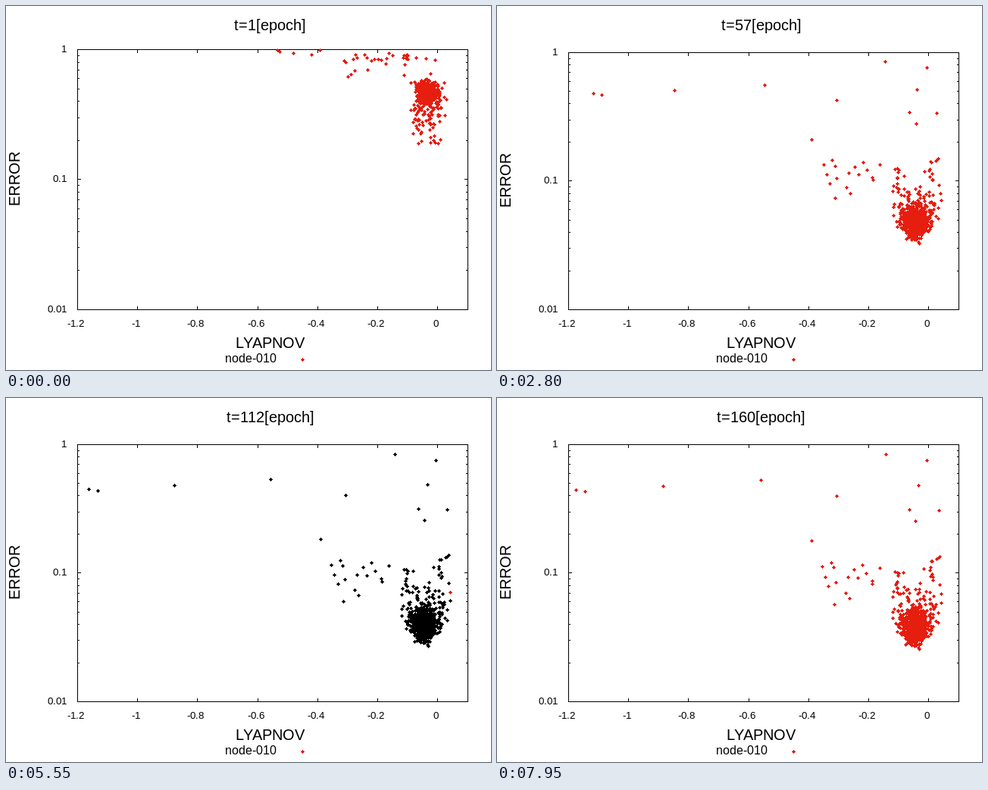
Recreate the animation shown at these times as an HTML page with a canvas. Size 640 by 480 pixels, loop 8000 ms.

```html
<!DOCTYPE html>
<html lang="en">
<head>
<meta charset="utf-8">
<title>Error against exponent</title>
<style>
html, body { margin: 0; width: 100%; height: 100%; overflow: hidden; background: #fff; }
canvas { display: block; width: 640px; height: 480px; }
</style>
</head>
<body>
<canvas id="stage" width="640" height="480"></canvas>
<script>
const ctx = document.getElementById('stage').getContext('2d');
const STEP = 50, EPOCHS = 160, BLACK_EPOCH = 112;
const RED = '#e51e10', BLACK = '#000';
const LEFT = 94, RIGHT = 609, BOTTOM = 400;

let seed = 20117;
const random = () => (seed = (seed * 16807) % 2147483647) / 2147483647;
const bell = () => (random() + random() + random() - 1.5) * 2;
const many = (length, make) => Array.from({ length }, make);
const mix = (a, b, k) => a + (b - a) * k;

// The swarm is wide on top and narrow below; some nodes trail off in a tail.
const swarm = many(620, () => {
  const trails = random() < 0.2;
  const v = bell();
  const u = bell() * (trails ? 1.6 : 1 - 0.2 * v);
  return { u, v, tail: trails ? Math.min(2.6, -Math.log(random())) : 0 };
});

// Strays travel from x0, y0 to x1, y1.
const marked = [570, 130, 586.3, 258.4];
const outliers = [
  [358, 58, 104, 121], [361, 60, 116, 123], [379, 62, 219, 116], [403, 64, 348, 108],
  [414, 58, 415, 188], [446, 72, 448, 129], [505, 62, 513, 74], [530, 65, 556, 115],
  [541, 68, 544, 147], [554, 69, 583, 148], [566, 71, 567, 82], [560, 89, 552, 162]
];
const leftSkirt = many(28, () => {
  const reach = random() ** 2;
  return [530 - 85 * reach, 64 + 50 * random() ** 2, 530 - 105 * reach, 245 + 20 * bell()];
});
const rightEdge = many(13, () => {
  const rise = random();
  return [560 + 12 * random(), 100 + 45 * random(), 568 + 16 * random(), 285 - 80 * rise];
});
const strays = [...outliers, ...leftSkirt, ...rightEdge];

// Training is fast at first and slows down over log(epoch).
const progress = t => 1 - (1 - Math.log(t) / Math.log(EPOCHS)) ** 1.5;

const snap = v => Math.ceil(v - 0.5);

function rect(x, y, w, h) {
  ctx.fillRect(snap(x), snap(y), w, h);
}

function diamond(x, y, color) {
  ctx.fillStyle = color;
  rect(x - 2, y, 5, 1);
  rect(x - 1, y - 1, 3, 3);
  rect(x, y - 2, 1, 5);
}

const setFont = size => ctx.font = `${size}px "Liberation Sans", Arial, sans-serif`;
const widthOf = text => ctx.measureText(text).width;

// Glyphs stand on whole pixels, with rounded advances and kerning.
function label(text, x, y, size, align = 0.5) {
  setFont(size);
  let pen = 0;
  const starts = [...text].map((glyph, i) => {
    const before = text[i - 1] || '';
    if (before) pen += Math.round(widthOf(before + glyph) - widthOf(before) - widthOf(glyph));
    const at = pen;
    pen += Math.round(widthOf(glyph));
    return at;
  });
  const left = Math.floor(x - pen * align);
  starts.forEach((at, i) => ctx.fillText(text[i], left + at, y));
}

function drawAxes(top, t) {
  const width = RIGHT - LEFT, height = BOTTOM - top;
  ctx.fillStyle = BLACK;
  for (const y of [top, BOTTOM]) rect(LEFT, y, width + 1, 1);
  for (const x of [LEFT, RIGHT]) rect(x, top, 1, height + 1);

  for (let i = 0; i <= 6; i++) {
    const x = LEFT + i * 0.2 * width / 1.3;
    rect(x, top, 1, 5);
    rect(x, BOTTOM - 4, 1, 5);
    label(String((i * 2 - 12) / 10), x - 1.5, 423, 13.333);
  }
  for (let decade = 0; decade < 2; decade++) {
    for (let n = 1; n < 10; n++) {
      const y = BOTTOM - (decade + Math.log10(n)) * height / 2;
      const size = n === 1 ? 5 : 3;
      rect(LEFT, y, size, 1);
      rect(RIGHT - size + 1, y, size, 1);
    }
  }
  ['1', '0.1', '0.01'].forEach((text, i) =>
    label(text, 80, Math.floor(top + i * height / 2) + 4, 13.333, 1));

  label(`t=${t}[epoch]`, 349, 32, 20);
  label('LYAPNOV', 349, 451, 20);
  label('node-010', 357, 470, 16, 1);

  ctx.save();
  ctx.translate(18, snap((top + BOTTOM) / 2));
  ctx.rotate(-Math.PI / 2);
  setFont(20);
  ctx.fillText('ERROR', -widthOf('ERROR') / 2, 0);
  ctx.restore();
}

function drawPoints(t) {
  const k = progress(t);
  const color = t === BLACK_EPOCH ? BLACK : RED;
  const cx = mix(555, 551, k), cy = mix(114, 303, k);
  const sx = mix(6.5, 9, k), sy = mix(7, 11, k);
  const tail = mix(23, -22, k);
  const drawStray = ([x0, y0, x1, y1], paint) => diamond(mix(x0, x1, k), mix(y0, y1, k), paint);

  for (const n of swarm) diamond(cx + sx * n.u, cy + sy * n.v + tail * n.tail, color);
  for (const s of strays) drawStray(s, color);
  drawStray(marked, RED);
  diamond(391, 466, RED);
}

let shown = 0;
function render(now) {
  const t = Math.floor(now / STEP) % EPOCHS + 1;
  if (t === shown) return;
  shown = t;
  ctx.fillStyle = '#fff';
  ctx.fillRect(0, 0, 640, 480);
  drawAxes(t === 1 ? 57 : 61, t);
  drawPoints(t);
}

const start = performance.now();
function tick() {
  render(performance.now() - start);
  requestAnimationFrame(tick);
}
tick();
</script>
</body>
</html>
```
